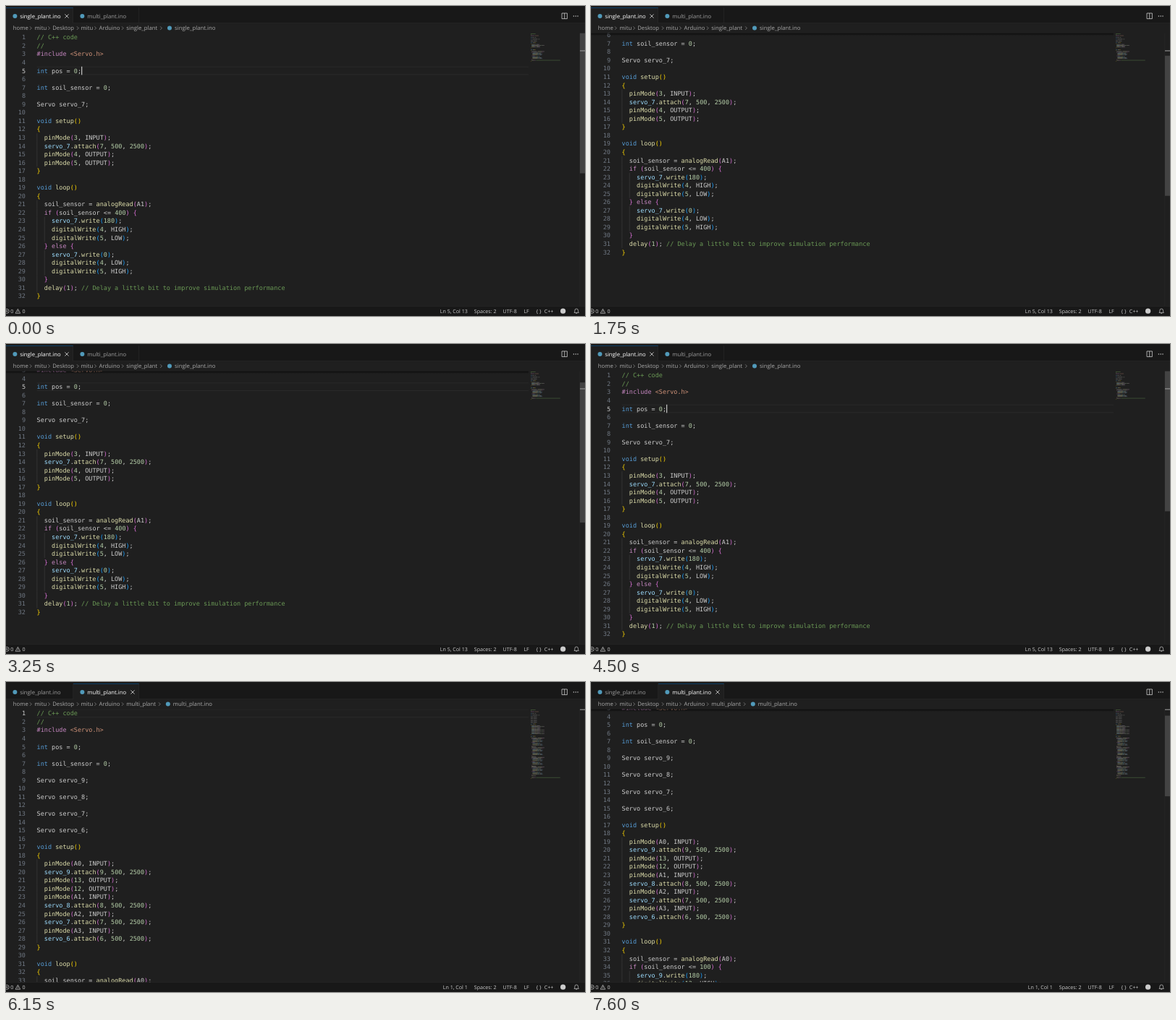
These frames come from a looping animation (800x429 px, 8 s). An HTML page:

```html
<!DOCTYPE html>
<html lang="en">
<head>
<meta charset="utf-8">
<title>Code editor</title>
<style>
  html, body { margin: 0; width: 100%; height: 100%; overflow: hidden; background: #181818; }
  svg { display: block; width: 800px; height: 429px; }
  text { white-space: pre; text-rendering: geometricPrecision; }
  .code { font: 8.51px "DejaVu Sans Mono", monospace; fill: #ccc; }
  .ui { font: 7.75px "Open Sans", "Noto Sans", sans-serif; fill: #a9a9a9; }
  .status { font-size: 7.1px; fill: #ccc; }
</style>
</head>
<body>
<svg id="stage" viewBox="0 0 800 429" xmlns="http://www.w3.org/2000/svg"></svg>
<script>
const LOOP = 8000, TOP = 37.6, BOTTOM = 415.3, VIEW = BOTTOM - TOP;
const LINE = 11.55, CHAR = 5.123, LEFT = 42.6, TICK = 30.4;
const SWITCH = 6100;
// [time, wheel ticks scrolled]
const SCROLL = [[0, 0], [1600, 1], [1750, 2], [1900, 3], [2050, 4], [2750, 3],
  [3000, 2], [3250, 1], [3750, 0], [7600, 1]];
// [time, scrollbar opacity]
const FADE = [[0, 1], [5200, 1], [6000, 0], [6400, 0], [6500, 1], [LOOP, 1]];
// [time, caret shown]
const CARET = [[0, 1], [50, 0], [500, 1], [1000, 0], [1500, 1], [2000, 0], [2500, 1],
  [3000, 0], [3500, 1], [4000, 0], [4500, 1], [5000, 0], [5500, 1], [6000, 0],
  [6200, 1], [6650, 0], [7150, 1], [7600, 0]];

const HEAD = `// C++ code
//
#include <Servo.h>

int pos = 0;

int soil_sensor = 0;
`;
const DELAY = '  delay(1); // Delay a little bit to improve simulation performance\n}';

const branch = (pin, limit, servo, a, b) => `  soil_sensor = analogRead(${pin});
  if (soil_sensor <= ${limit}) {
    servo_${servo}.write(180);
    digitalWrite(${a}, HIGH);
    digitalWrite(${b}, LOW);
  } else {
    servo_${servo}.write(0);
    digitalWrite(${a}, LOW);
    digitalWrite(${b}, HIGH);
  }
`;

const SINGLE = `${HEAD}
Servo servo_7;

void setup()
{
  pinMode(3, INPUT);
  servo_7.attach(7, 500, 2500);
  pinMode(4, OUTPUT);
  pinMode(5, OUTPUT);
}

void loop()
{
${branch('A1', 400, 7, 4, 5)}${DELAY}`;

const servos = [9, 8, 7, 6];
const MULTI = `${HEAD}
${servos.map(n => `Servo servo_${n};\n\n`).join('')}void setup()
{
${servos.map((n, i) => `  pinMode(A${i}, INPUT);
  servo_${n}.attach(${n}, 500, 2500);
${i ? '' : '  pinMode(13, OUTPUT);\n  pinMode(12, OUTPUT);\n'}`).join('')}}

void loop()
{
${servos.map((n, i) => branch('A' + i, 100, n, 13, 12) + '  delay(10);\n').join('')}
${DELAY}`;

const stage = document.getElementById('stage');

function add(parent, tag, attrs = {}, content) {
  const el = document.createElementNS('http://www.w3.org/2000/svg', tag);
  for (const key in attrs) el.setAttribute(key, attrs[key]);
  if (content !== undefined) el.textContent = content;
  return parent.appendChild(el);
}
const box = (p, x, y, width, height, fill, more) =>
  add(p, 'rect', { x, y, width, height, fill, ...more });
const label = (p, x, y, str, cls = 'ui', more) =>
  add(p, 'text', { x, y, class: cls, ...more }, str);
const stroke = (p, d, color = '#ccc', width = 0.7) =>
  add(p, 'path', { d, fill: 'none', stroke: color, 'stroke-width': width });
const dot = (p, cx, cy, r, fill) => add(p, 'circle', { cx, cy, r, fill });

const TOKENS = [
  [/\/\/.*/y, '#6a9955'],
  [/#include/y, '#c586c0'],
  [/<\w+\.h>/y, '#ce9178'],
  [/(int|void)\b/y, '#569cd6'],
  [/(if|else)\b/y, '#c586c0'],
  [/\d+\b/y, '#b5cea8'],
  [/\w+(?=\()/y, '#dcdcaa'],
  [/\w+(?=\.)/y, '#9cdcfe'],
  [/[(){}]/y, null],
  [/\w+/y, '#ccc'],
  [/\s+/y, '#ccc'],
  [/./y, '#ccc']
];
const BRACKETS = ['#ffd700', '#da70d6', '#179fff'];

function tokenize(src) {
  let depth = 0;
  return src.split('\n').map(line => {
    const out = [];
    for (let pos = 0; pos < line.length;) {
      for (const [re, color] of TOKENS) {
        re.lastIndex = pos;
        const hit = re.exec(line);
        if (!hit) continue;
        const str = hit[0];
        let fill = color;
        if (!fill) {
          const level = '({'.includes(str) ? depth++ : --depth;
          fill = BRACKETS[level % 3];
        }
        out.push({ str, fill, pos });
        pos += str.length;
        break;
      }
    }
    return out;
  });
}

function tab(p, x, width, name, closeX, active) {
  box(p, x, 2.4, width, 21.6, active ? '#1f1f1f' : '#181818');
  if (active) box(p, x, 2.4, width, 0.6, '#0078d4', { opacity: 0.7 });
  else box(p, x, 23.4, width, 0.6, '#2b2b2b');
  box(p, x + width - 0.6, 2.4, 0.6, 21.6, '#2b2b2b');
  dot(p, x + 12.4, 14, 3, '#519aba');
  label(p, x + 19.2, 16.7, name, 'ui', { style: `fill:${active ? '#fff' : '#9d9d9d'}` });
  if (active) stroke(p, `M${closeX - 2.6} 11.4l5.2 5.2m0-5.2l-5.2 5.2`, '#ddd', 0.8);
}

function crumbs(p, name, nameEnd) {
  const parts = [['home', 9.8, 34], ['mitu', 39.6, 59.4], ['Desktop', 64.2, 99], ['mitu', 103.6, 123.4],
    ['Arduino', 128.6, 161], [name, 166.3, nameEnd]];
  for (const [str, x, sep] of parts) {
    label(p, x, 33.3, str);
    stroke(p, `M${sep - 1} 28.4l2.2 2.2l-2.2 2.2`, '#a9a9a9', 0.6);
  }
  dot(p, nameEnd + 11.8, 30.6, 3, '#519aba');
  label(p, nameEnd + 18.8, 33.3, name + '.ino');
}

function makeDoc({ src, name, nameEnd, caretLine, caretCol, place, placeX }) {
  const root = add(stage, 'g');
  const single = name === 'single_plant';
  tab(root, 0, 93, 'single_plant.ino', 84, single);
  tab(root, 93, 91, 'multi_plant.ino', 175, !single);
  crumbs(root, name, nameEnd);
  label(root, placeX, 424.9, place, 'ui status');

  const view = add(root, 'g', { 'clip-path': 'url(#view)' });
  const page = add(view, 'g');
  const map = add(root, 'g', { opacity: 0.5 });
  const lines = tokenize(src);

  const rowY = TOP + caretLine * LINE;
  stroke(page, `M${LEFT} ${rowY + 0.4}H722M${LEFT} ${rowY + LINE - 0.4}H722`, '#292929', 1);

  lines.forEach((tokens, i) => {
    const y = TOP + i * LINE, base = y + 8.75;
    label(page, 27, base, i + 1, 'code',
      { 'text-anchor': 'end', style: `fill:${i === caretLine ? '#ccc' : '#6e7681'}` });
    if (!tokens.length) return;
    const indent = /^ *$/.test(tokens[0].str) ? tokens[0].str.length : 0;
    for (let k = 0; k < indent; k += 2)
      box(page, LEFT + k * CHAR, y, 0.6, LINE + 0.05, '#404040');
    const row = add(page, 'text', { x: LEFT, y: base, class: 'code' });
    for (const { str, fill, pos } of tokens) {
      add(row, 'tspan', { fill }, str);
      if (str.trim())
        box(map, 725 + pos * 0.608, 38.2 + i * 1.216, str.length * 0.608, 0.8, fill,
          { opacity: str.startsWith('//') ? 0.9 : 0.75 });
    }
  });

  const caret = box(page, LEFT + caretCol * CHAR, rowY, 1.2, LINE, '#c8c8c6');
  const shade = box(view, 0, TOP, 722, 3.6, 'url(#shade)');

  const ratio = VIEW / (lines.length * LINE + VIEW - LINE);
  box(root, 792.6, TOP, 0.6, VIEW, '#2b2b2b');
  const slider = box(root, 793, TOP, 7, VIEW * ratio, '#797979');
  box(root, 793, TOP + caretLine * LINE * ratio, 7, 1.3, '#a0a0a0', { opacity: 0.8 });

  return {
    root,
    draw(scroll, fade, caretOn) {
      page.setAttribute('transform', `translate(0 ${-scroll})`);
      slider.setAttribute('y', TOP + scroll * ratio);
      slider.setAttribute('opacity', 0.4 * fade);
      shade.setAttribute('opacity', scroll ? 1 : 0);
      caret.setAttribute('opacity', caretOn);
    }
  };
}

function makeFrame() {
  const defs = add(stage, 'defs');
  box(add(defs, 'clipPath', { id: 'view' }), 0, TOP, 800, VIEW);
  const grad = add(defs, 'linearGradient', { id: 'shade', x2: 0, y2: 1 });
  add(grad, 'stop', { offset: 0, 'stop-color': '#000', 'stop-opacity': 0.6 });
  add(grad, 'stop', { offset: 1, 'stop-color': '#000', 'stop-opacity': 0 });

  box(stage, 0, 0, 800, 429, '#181818');
  box(stage, 184, 23.4, 616, 0.6, '#2b2b2b');
  box(stage, 0, 24, 800, BOTTOM - 24, '#1f1f1f');
  box(stage, 0, BOTTOM, 800, 0.6, '#2b2b2b');

  stroke(stage, 'M768 10h7.4v7.6h-7.4zM771.7 10v7.6', '#ccc', 0.8);
  for (const x of [784.4, 787.2, 790]) dot(stage, x, 14, 0.75, '#ccc');

  add(stage, 'circle', { cx: 1.2, cy: 422.3, r: 3, fill: 'none', stroke: '#ccc', 'stroke-width': 0.7 });
  stroke(stage, 'M0 421.1l2.4 2.4m0-2.4l-2.4 2.4');
  stroke(stage, 'M16.4 419.2l3.3 6h-6.6zM16.4 421.4v1.9m0 .6v.7');
  const items = [[6.2, '0'], [22.4, '0'], [646.8, 'Spaces: 2'], [686.6, 'UTF-8'],
    [715.4, 'LF'], [732.4, '{ }'], [743.8, 'C++']];
  for (const [x, str] of items) label(stage, x, 424.9, str, 'ui status');
  dot(stage, 769.6, 422.2, 3.6, '#ccc');
  stroke(stage, 'M785 424.4h6.4l-.9-1.5v-1.6a2.3 2.3 0 0 0-4.6 0v1.6zM787.3 424.6a.9.9 0 0 0 1.8 0');
}

function step(table, t) {
  let value = table[0][1];
  for (const [at, v] of table) if (t >= at) value = v;
  return value;
}
function ramp(table, t) {
  const i = table.findIndex(([at]) => at > t);
  const [t0, a] = table[i - 1], [t1, b] = table[i];
  return a + (b - a) * (t - t0) / (t1 - t0);
}

makeFrame();
const docs = [
  makeDoc({ src: SINGLE, name: 'single_plant', nameEnd: 214.2, caretLine: 4, caretCol: 12,
    place: 'Ln 5, Col 13', placeX: 599.8 }),
  makeDoc({ src: MULTI, name: 'multi_plant', nameEnd: 212, caretLine: 0, caretCol: 0,
    place: 'Ln 1, Col 1', placeX: 603.8 })
];

const start = performance.now();
function render() {
  const t = (performance.now() - start) % LOOP;
  const current = t < SWITCH ? 0 : 1;
  docs.forEach((doc, i) => doc.root.setAttribute('display', i === current ? 'inline' : 'none'));
  docs[current].draw(step(SCROLL, t) * TICK, ramp(FADE, t), step(CARET, t));
  requestAnimationFrame(render);
}
render();
</script>
</body>
</html>
```
